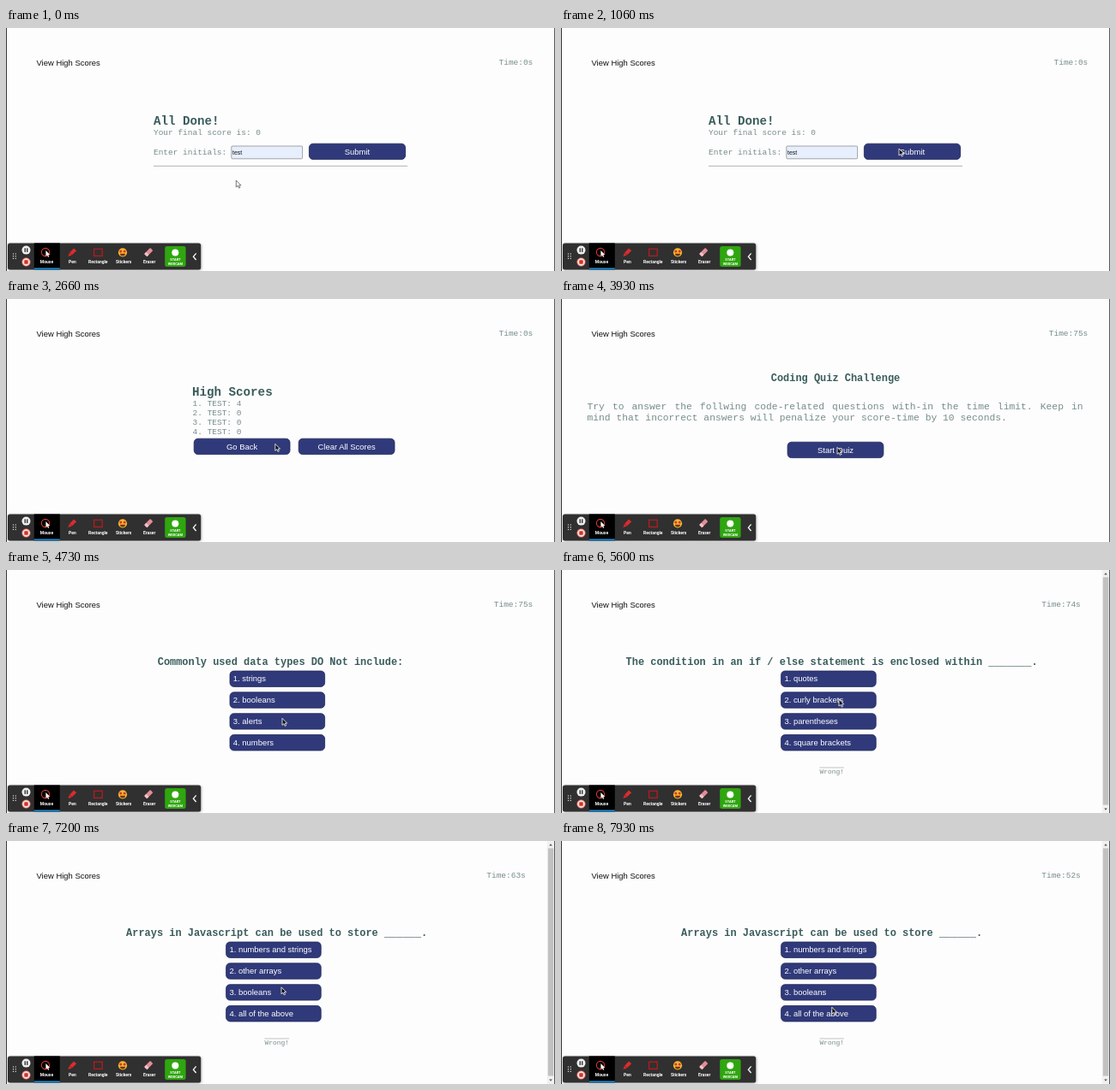
Write an HTML page that moves like this. It is 640 px wide and 284 px high and loops after 8000 ms.

```html
<!DOCTYPE html>
<html lang="en">
<head>
<meta charset="utf-8">
<title>Coding quiz</title>
<style>
  html, body { margin: 0; width: 100%; height: 100%; overflow: hidden; background: #fdfdfd; }
  svg { display: block; width: 640px; height: 284px; }
  text { white-space: pre; }
  .mono { font: 9.47px "Liberation Mono", monospace; fill: #788c8c; }
  .h2 { font: bold 14.2px "Liberation Mono", monospace; fill: #3a5c5c; }
  .h3 { font: bold 11.95px "Liberation Mono", monospace; fill: #3a5c5c; }
  .para { font-size: 11.33px; }
  .small { font-size: 7.9px; }
  .sans { font: 9.45px "Liberation Sans", Arial, sans-serif; }
  .label { font: bold 5px Roboto, sans-serif; fill: #fff; }
  .cam { font: bold 4px Roboto, sans-serif; fill: #fff; }
  .mid { text-anchor: middle; }
  .end { text-anchor: end; }
</style>
</head>
<body>
<svg id="stage" viewBox="0 0 640 284" xmlns="http://www.w3.org/2000/svg"></svg>
<script>
const LOOP = 8000;
const SHIFT = -4.4;   // the page moves left when the scrollbar takes its room
const stage = document.getElementById('stage');

const text = (cls, x, y, str, extra = '') =>
  `<text class="${cls}" x="${x}" y="${y}" ${extra}>${str}</text>`;
const rect = (x, y, w, h, fill, extra = '') =>
  `<rect x="${x}" y="${y}" width="${w}" height="${h}" fill="${fill}" ${extra}/>`;

function button(x, y, w, label, left) {
  const box = rect(x + .4, y + .4, w - .8, 18.4, '#303a7a', 'rx="4.6" stroke="#1f2658" stroke-width=".8"');
  return box + (left
    ? text('sans', x + 4.2, y + 12.7, label, 'fill="#fff"')
    : text('sans mid', x + w / 2, y + 12.9, label, 'fill="#fff"'));
}

function question(title, answers, shift) {
  return text('h3 mid', 320 + shift, 111, title) +
    answers.map((a, i) => button(260.6 + shift, 117.6 + i * 24.85, 111.4, `${i + 1}. ${a}`, true)).join('');
}

const wrong = rect(301.4, 230.6, 28.6, .7, '#aaa') + text('mono small mid', 315.7, 237.5, 'Wrong!');

const scrollbar = rect(630.8, 0, 8.4, 284, '#f1f1f1') +
  rect(631.8, 8.5, 6.4, 266, '#c1c1c1') +
  '<path d="M633.2 5.4h3.6l-1.8-2.2zM633.2 278.6h3.6l-1.8 2.2z" fill="#505050"/>';

const done =
  text('h2', 172, 113, 'All Done!') +
  text('mono', 172, 125, 'Your final score is: 0') +
  text('mono', 172, 148, 'Enter initials:') +
  rect(262.8, 138, 82.8, 14.8, '#e6effb', 'rx="1" stroke="#8b8f96" stroke-width=".8"') +
  text('sans', 264, 147.8, 'test', 'fill="#111" style="font-size:6.9px"') +
  button(353, 134.8, 113, 'Submit') +
  rect(172, 160.8, 296, .9, '#a9a9a9');

const scores =
  text('h2', 217, 113, 'High Scores') +
  [4, 0, 0, 0].map((n, i) => text('mono', 217.6, 125 + i * 11, `${i + 1}. TEST: ${n}`)).join('') +
  button(218.8, 162.8, 112.6, 'Go Back') +
  button(340.8, 162.8, 112.6, 'Clear All Scores');

const intro =
  text('h3 mid', 320, 96, 'Coding Quiz Challenge') +
  text('mono para', 30.4, 129, 'Try to answer the follwing code-related questions with-in the time limit. Keep in', 'word-spacing="2.3"') +
  text('mono para', 30.4, 141.7, 'mind that incorrect answers will penalize your score-time by 10 seconds.') +
  button(263.7, 166.8, 112.6, 'Start Quiz');

const answers = y => [0, 1, 2, 3].map(i => [260, y + i * 24.85, 112]);

// start time, drawing, buttons as [x, y, width], scrollbar shown
const scenes = [
  { at: 0, art: done, hits: [[353, 135, 113]] },
  { at: 1330, art: scores, hits: [[219, 163, 112], [341, 163, 112]] },
  { at: 3130, art: intro, hits: [[264, 167, 112]] },
  { at: 4260, hits: answers(117.6),
    art: question('Commonly used data types DO Not include:', ['strings', 'booleans', 'alerts', 'numbers'], 0) },
  { at: 5460, hits: answers(117.6), bar: true,
    art: question('The condition in an if / else statement is enclosed within _______.',
      ['quotes', 'curly brackets', 'parentheses', 'square brackets'], SHIFT) + wrong + scrollbar },
  { at: 6800, hits: answers(117.6), bar: true,
    art: question('Arrays in Javascript can be used to store ______.',
      ['numbers and strings', 'other arrays', 'booleans', 'all of the above'], SHIFT) + wrong + scrollbar }
];

const clock = [[0, 0], [3130, 75], [5460, 74], [6460, 63], [7460, 52]];

// pointer stops: time, x, y
const path = [
  [0, 268.3, 178], [60, 268.3, 178], [860, 393, 143], [930, 393, 143], [1060, 394, 141],
  [1600, 394, 141], [2400, 316, 171], [2530, 316, 171], [2660, 313.8, 169.3],
  [3530, 313.8, 169.3], [3930, 322, 173.3], [4860, 322, 173.3], [5060, 324, 153],
  [5200, 324, 151], [5560, 324, 151], [6060, 325, 155], [6200, 325, 155], [6400, 324.5, 157.3],
  [6460, 324.5, 157.3], [6660, 325, 151], [6860, 325, 151], [7600, 316, 196],
  [7800, 316, 196], [7930, 315.8, 194.2], [8000, 315.8, 194.2]
];

const arrow = 'M0 0V8L1.9 6.3 3.2 9.1 4.5 8.5 3.3 5.8H5.7Z';

const tools = ['Mouse', 'Pen', 'Rectangle', 'Stickers', 'Eraser'];
const dots = [0, 1, 2, 3, 4, 5].map(i =>
  rect(7.9 + (i % 2) * 2.8, 263.4 + (i >> 1) * 2.7, 1.2, 1.2, '#ddd')).join('');

const toolbar =
  rect(2, 252, 226, 31.6, '#000', 'rx="3" opacity=".28" filter="url(#blur)"') +
  rect(2, 251.4, 225.2, 31, '#303031', 'rx="2.5"') + dots +
  '<circle cx="23.5" cy="259.6" r="5" fill="#eee"/>' +
  rect(21.6, 257.3, 1.3, 4.6, '#222') + rect(24.1, 257.3, 1.3, 4.6, '#222') +
  '<circle cx="23.5" cy="273.5" r="4.8" fill="#f4e4e2" stroke="#d9483b" stroke-width=".8"/>' +
  rect(21.3, 271.3, 4.4, 4.4, '#d93025', 'rx=".6"') +
  rect(32.8, 251.4, 30, 31, '#000') + rect(32.8, 280.4, 30, 2, '#1b86c9') +
  '<circle cx="46" cy="262" r="4.6" fill="none" stroke="#d8392f" stroke-width="1.1"/>' +
  '<path d="' + arrow + '" transform="translate(46.4 260) scale(.85)" fill="#fff"/>' +
  '<path d="M72.4 267l1.6-4.2 5-5.2 3.2 2.6-5.2 5z" fill="#dd2c2c"/>' +
  '<path d="M74 262.8l2.8 2.4" stroke="#7d1515" stroke-width=".7"/>' +
  rect(102.6, 258.2, 9.6, 8.2, 'none', 'stroke="#b51c1c" stroke-width="1.3"') +
  '<circle cx="136" cy="262.3" r="5.1" fill="#f5b52e"/>' +
  '<circle cx="133.8" cy="261" r="1.5" fill="#d8352b"/><circle cx="138.2" cy="261" r="1.5" fill="#d8352b"/>' +
  '<path d="M133 263.8h6a3 2.6 0 0 1-6 0z" fill="#69351a"/>' +
  '<g transform="rotate(-45 166.2 262)">' + rect(161.2, 259.8, 10, 4.6, '#e58c94', 'rx="1"') +
  rect(161.2, 259.8, 3.2, 4.6, '#f3c3c7', 'rx="1"') + '</g>' +
  tools.map((name, i) => text('label mid', 47.5 + i * 29.9, 275, name)).join('') +
  rect(185.2, 255, 24.4, 24, '#2fa60f', 'rx="2.5"') +
  '<circle cx="197.3" cy="262.6" r="4" fill="#fff"/>' +
  text('cam mid', 197.4, 272.4, 'START') + text('cam mid', 197.4, 276.6, 'WEBCAM') +
  '<path d="M221.6 263.4l-3.2 3.8 3.2 3.8" fill="none" stroke="#fff" stroke-width="1.3"/>';

stage.innerHTML =
  '<defs><filter id="blur" x="-5%" y="-30%" width="110%" height="160%"><feGaussianBlur stdDeviation="1.6"/></filter></defs>' +
  rect(0, 0, 640, 284, '#fdfdfd') +
  text('sans', 35.5, 43.8, 'View High Scores', 'fill="#111"') +
  text('mono end', 614.3, 43.4, '', 'id="time"') +
  scenes.map(s => `<g class="scene">${s.art}</g>`).join('') +
  rect(0, 0, .9, 284, '#222') + rect(639.2, 0, .8, 284, '#333') +
  toolbar +
  `<path id="pointer" d="${arrow}" stroke-width=".8" stroke-linejoin="round"/>`;

const groups = [...stage.querySelectorAll('.scene')];
const time = document.getElementById('time');
const pointer = document.getElementById('pointer');

function pointerAt(t) {
  const i = path.findIndex(p => p[0] > t);
  const [t0, x0, y0] = path[i - 1], [t1, x1, y1] = path[i];
  const u = (t - t0) / (t1 - t0), e = u * u * (3 - 2 * u);
  return [x0 + (x1 - x0) * e, y0 + (y1 - y0) * e];
}

function draw(t) {
  const now = scenes.findLastIndex(s => s.at <= t);
  const { hits, bar } = scenes[now];
  const shift = bar ? SHIFT : 0;
  groups.forEach((g, i) => g.setAttribute('display', i === now ? 'inline' : 'none'));

  time.textContent = `Time:${clock.findLast(c => c[0] <= t)[1]}s`;
  time.setAttribute('x', bar ? 605.8 : 614.3);

  const [x, y] = pointerAt(t);
  const over = hits.some(([bx, by, w]) =>
    x > bx + shift && x < bx + shift + w && y + 5 > by && y + 5 < by + 19);
  pointer.setAttribute('transform', `translate(${x.toFixed(2)} ${y.toFixed(2)})`);
  pointer.setAttribute('fill', over ? '#111' : '#fff');
  pointer.setAttribute('stroke', over ? '#fff' : '#555');
}

const start = performance.now();
function tick() {
  draw((performance.now() - start) % LOOP);
  requestAnimationFrame(tick);
}
tick();
</script>
</body>
</html>
```
